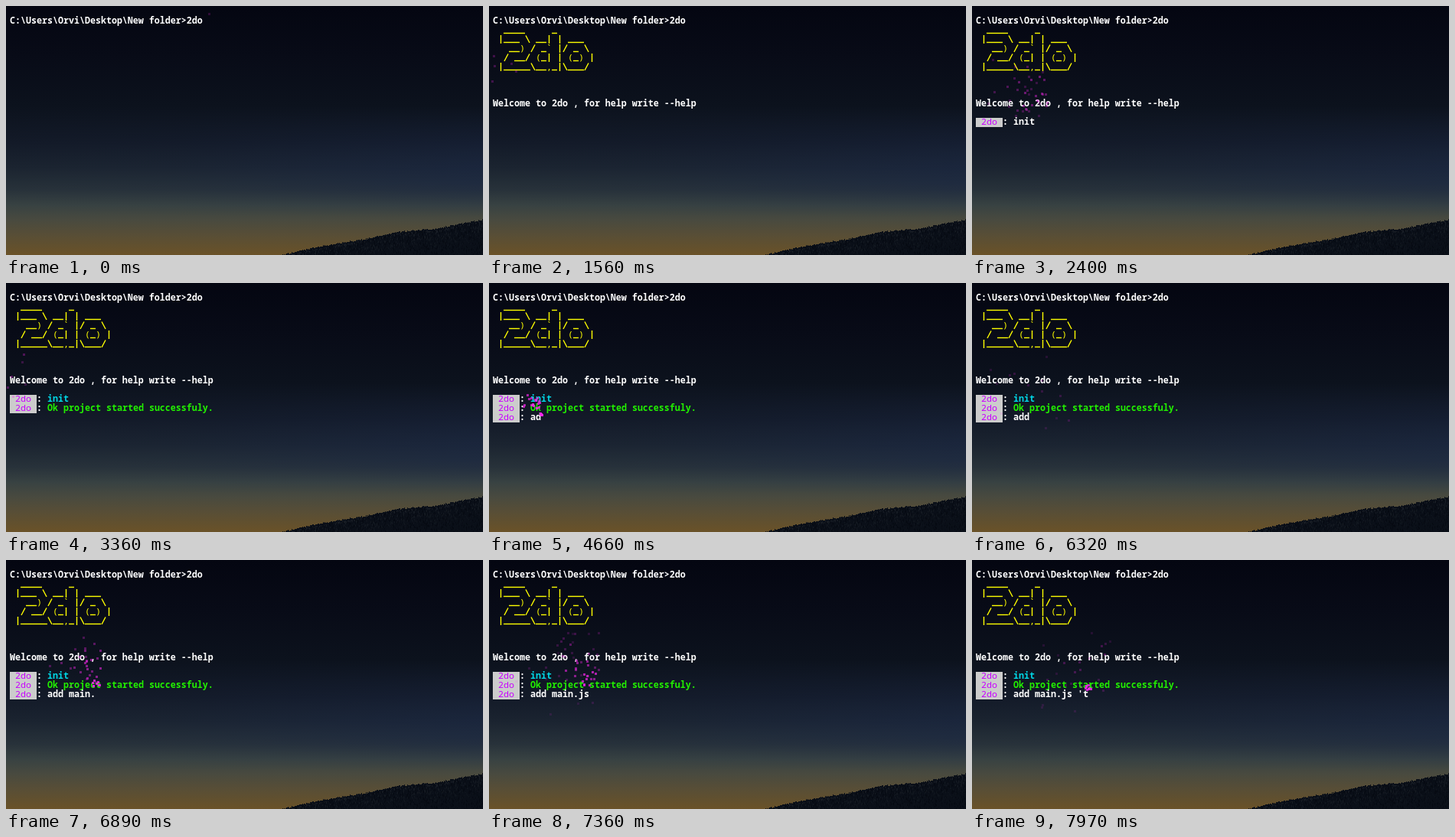
These frames come from a looping animation (623x325 px, 8000 ms). An HTML page with a canvas:

```html
<!DOCTYPE html>
<html>
<head>
<meta charset="utf-8">
<style>
  html, body { margin: 0; width: 100%; height: 100%; overflow: hidden; background: #05070f; }
  canvas { position: absolute; left: 0; top: 0; }
</style>
</head>
<body>
<canvas id="sky" width="623" height="325"></canvas>
<canvas id="term" width="623" height="325"></canvas>
<script>
const W = 623, H = 325, LOOP = 8000, LEFT = 5, COL = 7, ROW = 12, BASE = 23;
const sky = document.getElementById('sky').getContext('2d');
const term = document.getElementById('term').getContext('2d');

function random(seed) {
  return () => {
    seed = (seed + 0x6D2B79F5) | 0;
    let n = Math.imul(seed ^ (seed >>> 15), 1 | seed);
    n ^= n + Math.imul(n ^ (n >>> 7), 61 | n);
    return ((n ^ (n >>> 14)) >>> 0) / 4294967296;
  };
}

function gradient(x1, y1, stops) {
  const g = sky.createLinearGradient(0, 0, x1, y1);
  stops.forEach(([at, color]) => g.addColorStop(at, color));
  return g;
}

function drawSky() {
  sky.fillStyle = gradient(0, H, [
    [0, '#040611'], [.2, '#080b17'], [.4, '#0c121d'], [.55, '#131a28'], [.65, '#1b2430'],
    [.74, '#28323a'], [.8, '#384242'], [.86, '#494a3f'], [.92, '#584e36'], [1, '#6a5228']]);
  sky.fillRect(0, 0, W, H);
  // blue band above the horizon, stronger to the right
  sky.fillStyle = gradient(W, 0, [[0, 'rgba(26,40,72,0)'], [.35, 'rgba(26,40,72,.1)'], [1, 'rgba(26,40,72,.5)']]);
  for (let y = 130; y < 275; y++) {
    sky.globalAlpha = Math.min(1, (y - 130) / 80, (275 - y) / 45);
    sky.fillRect(0, y, W, 1);
  }
  sky.globalAlpha = 1;
}

function drawHill() {
  const ridge = [[360, 325], [390, 318], [420, 312], [470, 304], [510, 295], [560, 291], [600, 283], [623, 279]];
  const rnd = random(5);
  const top = x => {
    const i = Math.max(1, ridge.findIndex(p => p[0] >= x));
    const [ax, ay] = ridge[i - 1], [bx, by] = ridge[i];
    return ay + (by - ay) * (x - ax) / (bx - ax);
  };
  for (let x = 360; x < W; x++) {
    const y = Math.round(top(x) - rnd() * 2 + 1);
    sky.fillStyle = '#0a0f18';
    sky.fillRect(x, y, 1, H - y);
    for (let ty = y + 2; ty < H; ty += 2 + rnd() * 8) {
      sky.fillStyle = rnd() < .5 ? `rgba(34,40,46,${Math.max(.1, .6 - (ty - y) / 60)})` : '#060a12';
      sky.fillRect(x, ty, 1, 1 + Math.floor(rnd() * 3));
    }
  }
}

const ART = [
  '  ____     _',
  ' |___ \\ __| | ___',
  '   __) / _` |/ _ \\',
  '  / __/ (_| | (_) |',
  ' |_____\\__,_|\\___/'];

const INIT = 1740, ENTER = 2700, REPLY = 2860, ADD = 4500;
const typedInit = [[1800, 'i'], [1890, 'n'], [1970, 'i'], [2040, 't']];
const typedAdd = [[4550, 'a'], [4640, 'd'], [5435, 'd'], [5560, ' '], [6350, 'm'], [6440, 'a'], [6540, 'i'],
  [6640, 'n'], [6800, '.'], [6990, 'j'], [7100, 's'], [7260, ' '], [7380, "'"], [7905, 't']];

// each cursor move throws up a handful of sparks: [time, column, row]
const moves = [[-720, 36, 0], [60, 0, 1], [960, 0, 9], [INIT, 7, 11], [ENTER, 0, 12], [REPLY, 0, 12], [ADD, 7, 13],
  ...typedInit.map(([t], i) => [t, 8 + i, 11]),
  ...typedAdd.map(([t], i) => [t, 8 + i, 13])];

const sparks = moves.flatMap(([time, col, row], i) => {
  const rnd = random(i * 97 + 11);
  return Array.from({ length: 5 + Math.floor(rnd() * 5) }, () => ({
    time, x: LEFT + col * COL, y: 18 + row * ROW, vx: rnd() * 2 - 1, vy: -3.5 + rnd() * 2
  }));
});

function write(text, col, row, color, weight = 600) {
  term.font = `${weight} 11.667px "Noto Sans Mono", monospace`;
  term.fillStyle = color;
  term.fillText(text, LEFT + col * COL, BASE + row * ROW);
}

// bars and slashes are drawn as strokes that stay inside their own row
function drawArt() {
  term.strokeStyle = '#ffff00';
  term.lineWidth = 1.4;
  const strokes = { _: [0, .5, 7, .5], '|': [3.5, -9, 3.5, 2], '/': [1, 1, 6, -8.5], '\\': [1, -8.5, 6, 1] };
  ART.forEach((line, i) => [...line].forEach((char, col) => {
    if (!strokes[char]) return write(char, col, i + 1, '#ffff00', 400);
    const x = LEFT + col * COL, y = BASE + (i + 1) * ROW, [x1, y1, x2, y2] = strokes[char];
    term.beginPath();
    term.moveTo(x + x1, y + y1);
    term.lineTo(x + x2, y + y2);
    term.stroke();
  }));
}

function prompt(row, text, color) {
  term.fillStyle = '#cccccc';
  term.fillRect(LEFT, 14 + row * ROW, 5 * COL, ROW);
  write('2do', 1, row, '#c800ff', 400);
  write(':', 5, row, '#fff');
  write(text, 7, row, color);
}

const typed = (keys, t) => keys.filter(k => k[0] <= t).map(k => k[1]).join('');

function draw(t) {
  term.clearRect(0, 0, W, H);
  write('C:\\Users\\Orvi\\Desktop\\New folder>2do', 0, 0, '#fff');
  if (t >= 960) {
    drawArt();
    write('Welcome to 2do , for help write --help', 0, 9, '#fff');
  }
  if (t >= INIT) prompt(11, typed(typedInit, t), t < ENTER ? '#fff' : '#00d7e6');
  if (t >= REPLY) prompt(12, 'Ok project started successfuly.', '#22f000');
  if (t >= ADD) prompt(13, typed(typedAdd, t), '#fff');

  for (const s of sparks) {
    const n = (t - s.time) * .06, alpha = .96 ** n;
    if (n < 0 || alpha < .1) continue;
    term.fillStyle = `rgba(245,40,235,${alpha})`;
    term.fillRect(Math.round(s.x + s.vx * n - 1), Math.round(s.y + s.vy * n + .0375 * n * n - 1), 3, 3);
  }
}

// the picture advances in 120 ms steps, restarted at these times
function step(t) {
  const start = t < 4540 ? 0 : t < 6290 ? 4540 : 6290;
  return start + Math.floor((t - start) / 120) * 120;
}

drawSky();
drawHill();
(function frame() {
  draw(step(performance.now() % LOOP));
  requestAnimationFrame(frame);
})();
</script>
</body>
</html>
```
